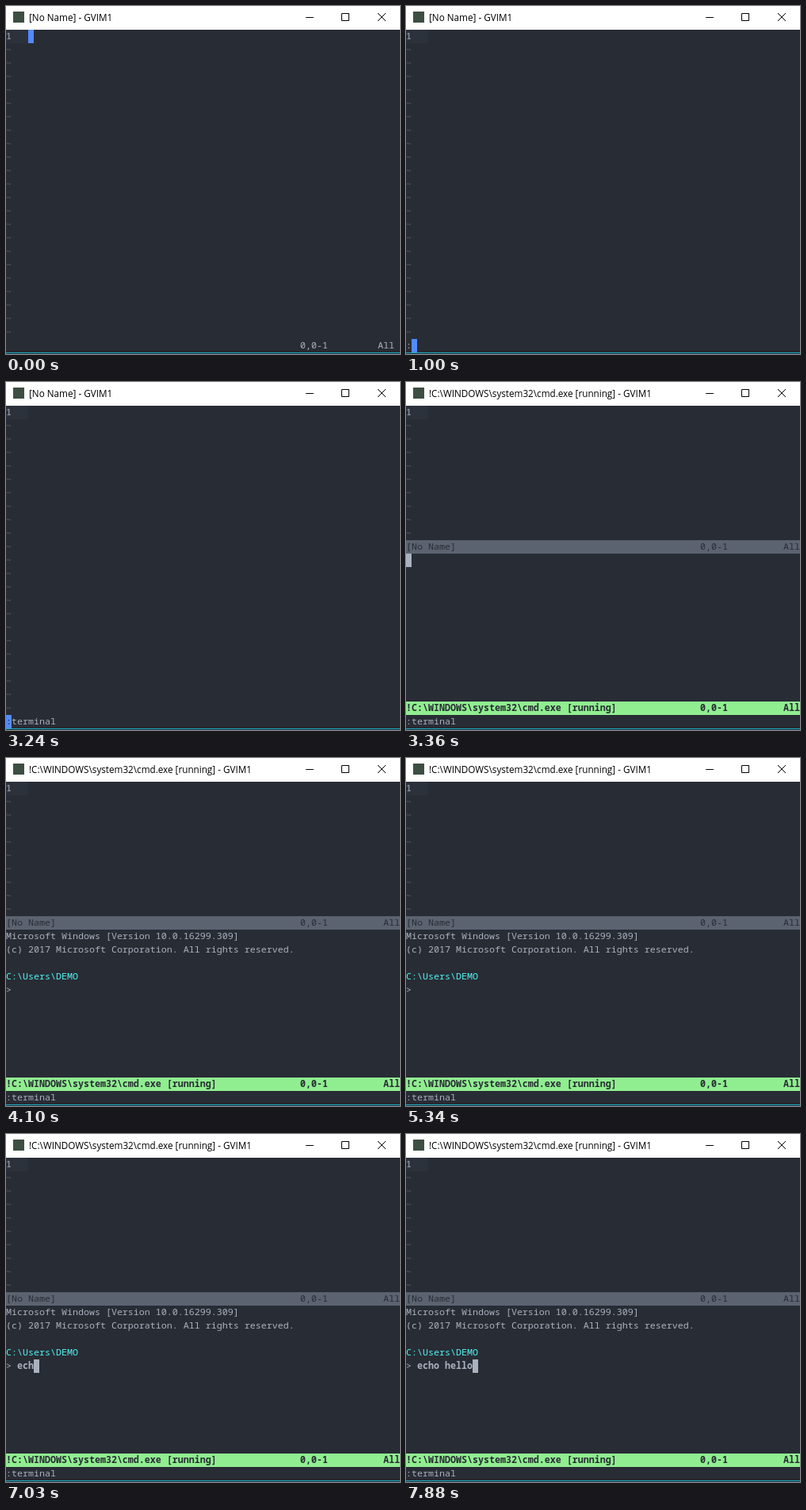
Animation, 497 px wide and 440 px high, one loop 8000 ms. Source, as an HTML page with a canvas:

```html
<!DOCTYPE html>
<html lang="en">
<head>
<meta charset="utf-8">
<title>Terminal inside an editor</title>
<style>
html, body { margin: 0; width: 100%; height: 100%; overflow: hidden; background: #282c34; }
canvas { display: block; }
</style>
</head>
<body>
<canvas id="stage" width="497" height="440"></canvas>
<script>
const ctx = document.getElementById('stage').getContext('2d', { alpha: false });
const W = 497, LOOP = 8000, TOP = 30, CELL_W = 7, CELL_H = 17, LAST_ROW = 23;
const MONO = '11.667px "Noto Sans Mono", "DejaVu Sans Mono", monospace';
const TITLE_FONT = '11.7px "Open Sans", "Noto Sans", sans-serif';
const C = {
  bg: '#282c34', text: '#abb2bf', lineNr: '#2c323c', tilde: '#5c6370',
  bar: '#5c6370', termBar: '#90ee90', cursor: '#528bff', path: '#4df5f5', edge: '#1cb0c4'
};
const SHELL = '!C:\\WINDOWS\\system32\\cmd.exe [running]';

// [time, characters typed so far]
const COMMAND = ':terminal';
const COMMAND_KEYS = [[1000, 1], [1500, 2], [1750, 4], [2000, 5], [2250, 6], [2370, 7], [2620, 8], [2740, 9]];
const INPUT = 'echo hello';
const INPUT_KEYS = [[6780, 1], [7030, 3], [7150, 4], [7270, 5], [7390, 7], [7510, 8], [7760, 9], [7880, 10]];
const BLINKS = [4100, 4350, 4720, 4970, 5340, 5590, 5990, 6270, 6640, 6780];
const RUN = 3240, SPLIT = 3360, PROMPT = 3480;

const typed = (keys, t) => keys.reduce((n, [at, count]) => t >= at ? count : n, 0);

function rect(color, x, y, w, h) {
  ctx.fillStyle = color;
  ctx.fillRect(x, y, w, h);
}

function cells(color, col, row, count = 1) {
  rect(color, col * CELL_W, TOP + row * CELL_H, count * CELL_W, CELL_H);
}

function write(text, col, row, color = C.text, bold = false) {
  ctx.font = (bold ? 'bold ' : '') + MONO;
  ctx.fillStyle = color;
  ctx.fillText(text, col * CELL_W, TOP + row * CELL_H + 12);
}

function titleBar(title) {
  rect('#fff', 0, 0, W, TOP);
  rect('#3d4f40', 9, 7, 14, 14);
  ctx.font = TITLE_FONT;
  ctx.fillStyle = '#000';
  ctx.fillText(title + ' - GVIM1', 29, 19);
  ctx.strokeStyle = '#000';
  ctx.lineWidth = 1;
  ctx.beginPath();
  ctx.moveTo(378, 14.5);
  ctx.lineTo(388, 14.5);
  ctx.rect(423.5, 9.5, 9, 9);
  ctx.moveTo(469, 9);
  ctx.lineTo(479, 19);
  ctx.moveTo(479, 9);
  ctx.lineTo(469, 19);
  ctx.stroke();
}

function buffer(rows) {
  cells(C.lineNr, 0, 0, 4);
  write('1', 0, 0);
  for (let row = 1; row < rows; row++) write('~', 0, row, C.tilde);
}

function statusBar(label, row, color, bold) {
  rect(color, 0, TOP + row * CELL_H, W, CELL_H);
  write(label, 0, row, C.bg, bold);
  write('0,0-1', 53, row, C.bg, bold);
  write('All', 68, row, C.bg, bold);
}

function drawEditor(t) {
  titleBar('[No Name]');
  buffer(LAST_ROW);
  const count = typed(COMMAND_KEYS, t);
  if (!count) {
    cells(C.cursor, 4, 0);
    write('0,0-1', 53, LAST_ROW);
    write('All', 67, LAST_ROW);
    return;
  }
  write(COMMAND.slice(0, count), 0, LAST_ROW);
  cells(C.cursor, t < RUN ? count : 0, LAST_ROW);
  if (t >= RUN) write(':', 0, LAST_ROW, C.bg);
}

function drawSplit(t) {
  titleBar(SHELL);
  buffer(10);
  statusBar('[No Name]', 10, C.bar, false);
  statusBar(SHELL, 22, C.termBar, true);
  write(COMMAND, 0, LAST_ROW);
  if (t < PROMPT) {
    cells(C.text, 0, 11);
    return;
  }
  write('Microsoft Windows [Version 10.0.16299.309]', 0, 11);
  write('(c) 2017 Microsoft Corporation. All rights reserved.', 0, 12);
  write('C:\\Users\\DEMO', 0, 14, C.path);
  write('>', 0, 15);
  const count = typed(INPUT_KEYS, t);
  write(INPUT.slice(0, count), 2, 15, C.text, true);
  const toggles = BLINKS.filter(at => t >= at).length;
  if (toggles % 2 === 0) cells(C.text, 2 + count, 15);
}

function draw(t) {
  rect(C.bg, 0, 0, W, 440);
  if (t < SPLIT) drawEditor(t);
  else drawSplit(t);
  rect(C.edge, 0, 438, W, 1);
}

const start = performance.now();
function tick() {
  draw((performance.now() - start) % LOOP);
  requestAnimationFrame(tick);
}
tick();
</script>
</body>
</html>
```
